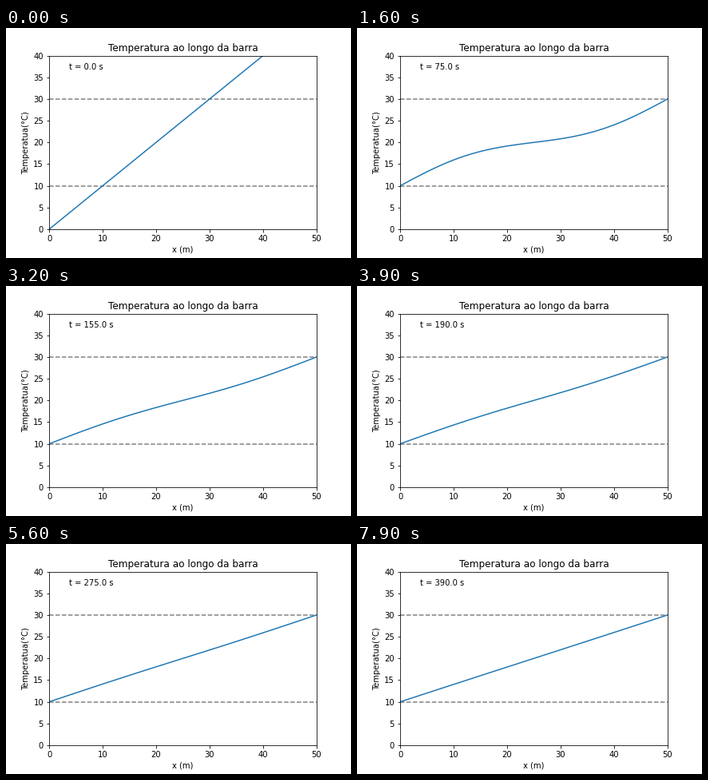
Write a matplotlib script that moves like this. It is 432 by 288 pixels and loops after 8 s.

```python
import numpy as np
import matplotlib.pyplot as plt
from matplotlib.animation import FuncAnimation

LENGTH, ALPHA = 50, 0.96
T_LEFT, T_START, T_RIGHT = 10, 20, 30
FRAMES, INTERVAL = 80, 100
FRAME_DT, SUBSTEPS = 5.0, 20

x = np.linspace(0, LENGTH, LENGTH + 1)
dx = x[1] - x[0]
r = ALPHA * FRAME_DT / SUBSTEPS / dx**2


def solve_rod(count):
    """Explicit heat equation with fixed end temperatures."""
    u = np.full_like(x, T_START)
    u[0], u[-1] = T_LEFT, T_RIGHT
    states = [u.copy()]
    for _ in range(count - 1):
        for _ in range(SUBSTEPS):
            u[1:-1] += r * (u[2:] - 2 * u[1:-1] + u[:-2])
        states.append(u.copy())
    return states


states = solve_rod(FRAMES - 1)

fig, ax = plt.subplots(figsize=(6, 4), dpi=72)
fig.subplots_adjust(left=0.125, right=0.9, bottom=0.125, top=0.88)
ax.set(xlim=(0, LENGTH), ylim=(0, 40), xlabel="x (m)",
       ylabel="Temperatua(°C)", title="Temperatura ao longo da barra")
for level in (T_LEFT, T_RIGHT):
    ax.plot([0, LENGTH], [level, level], "--", color="gray")
curve, = ax.plot(x, x, color="tab:blue")
clock = ax.text(0.075, 0.92, "", transform=ax.transAxes)


def update(i):
    # The opening frame holds the placeholder line y = x.
    step = max(i - 1, 0)
    curve.set_ydata(states[step] if i else x)
    clock.set_text(f"t = {step * FRAME_DT:.1f} s")
    return curve, clock


anim = FuncAnimation(fig, update, frames=FRAMES, interval=INTERVAL,
                     repeat=True, repeat_delay=0)
plt.show()
```
